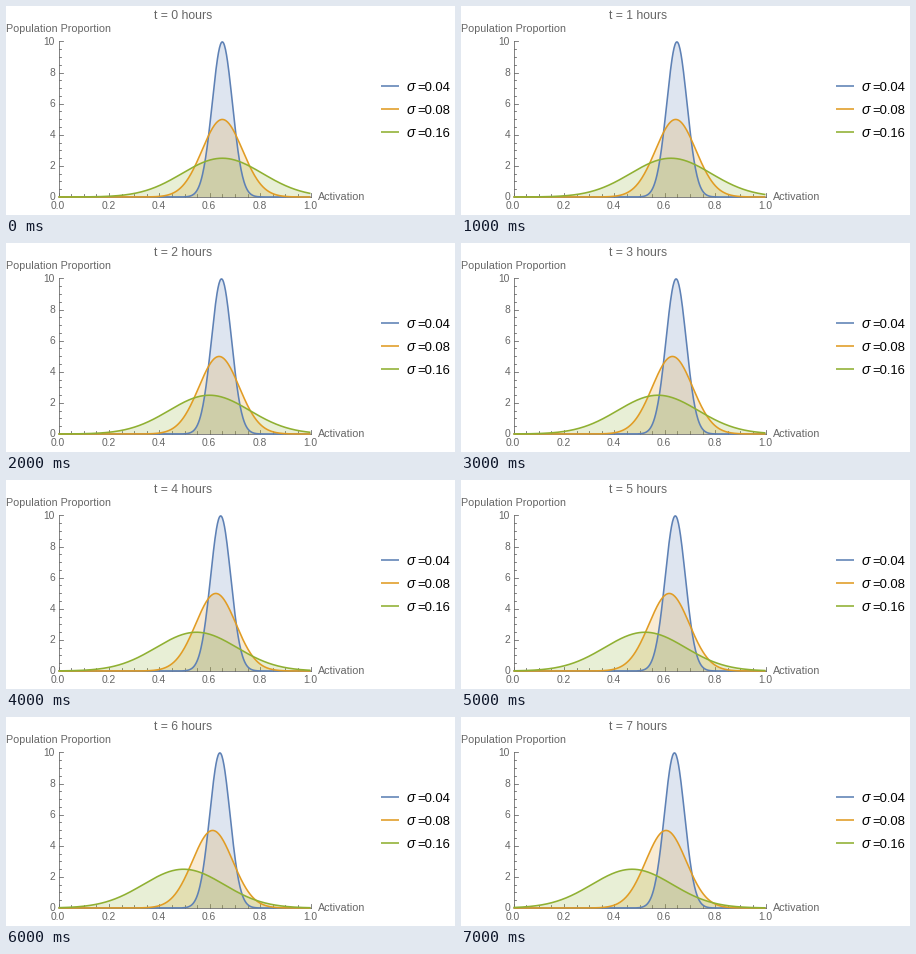
Recreate the animation shown at these times as a matplotlib script. Size 449x209 px, loop 8000 ms.

```python
import numpy as np
import matplotlib.pyplot as plt
from matplotlib.animation import FuncAnimation

W, H, DPI = 449, 209, 72  # at 72 dpi one point is one pixel
LEFT, RIGHT, BASE, TOP = 52.5, 304.5, 191, 35.5
GRAY = "#666666"
MEAN = 0.65
CURVES = [(0.04, "#5e81b5"), (0.08, "#e19c24"), (0.16, "#8fb032")]
HOURS = 8

plt.rcParams["font.family"] = "Liberation Sans"
fig = plt.figure(figsize=((W + 0.001) / DPI, (H + 0.001) / DPI),
                 dpi=DPI, facecolor="white")
ax = fig.add_axes([0, 0, 1, 1])
ax.set_xlim(0, W)
ax.set_ylim(H, 0)
ax.axis("off")


def px(x):
    return LEFT + (RIGHT - LEFT) * x


def py(y):
    return BASE + (TOP - BASE) * y / 10


def label(x, y, text, size, ha="left", color=GRAY, **kw):
    return ax.text(x, y, text, fontsize=size, ha=ha, va="baseline",
                   color=color, **kw)


def rule(xs, ys):
    ax.plot(xs, ys, color=GRAY, lw=0.8, zorder=1)


def draw_axes():
    rule([LEFT, RIGHT], [BASE, BASE])
    rule([LEFT, LEFT], [BASE, TOP])
    for i in range(21):
        major = i % 4 == 0
        size = 4 if major else 2.5
        x, y = px(i / 20), py(i / 2)
        rule([x, x], [BASE, BASE - size])
        rule([LEFT, LEFT + size], [y, y])
        if major:
            label(x - 0.5, 203.3, f"{i / 20:.1f}", 10.3, "center")
            label(49, y + 3.3, str(i // 2), 10.3, "right")
    label(0, 26, "Population Proportion", 10.8)
    label(312, 194, "Activation", 10.8)


def draw_legend():
    for i, (sigma, color) in enumerate(CURVES):
        y = 80.5 + 23 * i
        ax.plot([375, 393], [y, y], color=color, lw=1.6,
                solid_capstyle="butt")
        label(401, y + 4.5, "σ", 14, color="black", style="italic")
        label(411, y + 4.5, f"={sigma:.2f}", 13, color="black")


def density(x, mean, sigma):
    return np.exp(-((x - mean) / sigma) ** 2 / 2) / (sigma * np.sqrt(2 * np.pi))


draw_axes()
draw_legend()
title = label(177, 13, "", 12.2, "center")
grid = np.linspace(0, 1, 505)
fills = [ax.fill([0], [0], color=c, alpha=0.2, lw=0, zorder=2)[0]
         for _, c in CURVES]
lines = [ax.plot([], [], color=c, lw=1.6, zorder=3,
                 solid_capstyle="butt")[0] for _, c in CURVES]


def update(hour):
    title.set_text(f"t = {hour} hours")
    for (sigma, _), fill, line in zip(CURVES, fills, lines):
        # the mean drifts in proportion to the variance
        mean = MEAN - hour * sigma ** 2
        xs, ys = px(grid), py(density(grid, mean, sigma))
        line.set_data(xs, ys)
        outline = np.column_stack([xs, ys])
        fill.set_xy(np.vstack([[LEFT, BASE], outline, [RIGHT, BASE]]))
    return [title, *fills, *lines]


anim = FuncAnimation(fig, update, frames=HOURS, interval=1000,
                     repeat=True, repeat_delay=0, blit=False)
plt.show()
```
